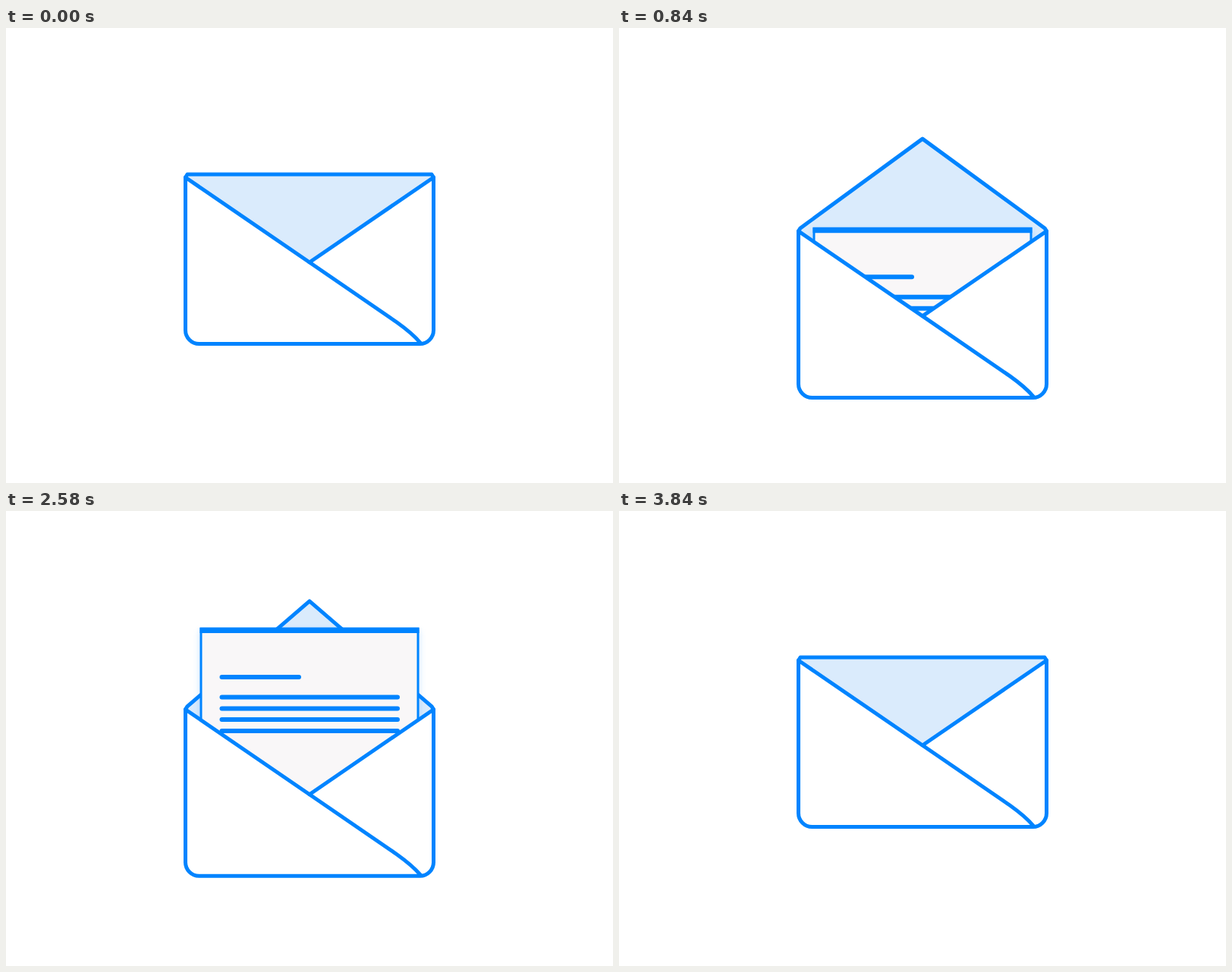
Recreate the animation shown at these times as an HTML page. Size 800 by 600 pixels, loop 4.14 s.

```html
<!DOCTYPE html>
<html lang="en">
<head>
<meta charset="utf-8">
<title>Opening envelope</title>
<style>
  html, body { margin: 0; height: 100%; overflow: hidden; background: #fff; }
  svg { display: block; width: 100%; height: 100%; }
  .line { fill: none; stroke: #0084ff; stroke-width: 5; stroke-linejoin: round; stroke-linecap: round; }
  .inside { fill: #daebfc; }
  #paper { filter: drop-shadow(0 5px 4px #0084ff38); }
</style>
</head>
<body>
<svg viewBox="0 0 800 600">
  <clipPath id="pocket"><rect x="200" y="-200" width="400" height="600"/></clipPath>
  <g id="envelope">
    <path class="inside" d="M237 195L400 309L563 195Z"/>
    <path id="flap" class="line inside"/>
    <g clip-path="url(#pocket)">
      <g id="paper">
        <rect x="257" y="2" width="286" height="300" fill="#f9f7f8" stroke="#0084ff" stroke-width="3"/>
        <path d="M255.5 3.8H544.5" stroke="#0084ff" stroke-width="7.5"/>
        <path class="line" stroke-width="6" style="stroke-width:6"
              d="M284.5 65.5H386M284.5 92H516M284.5 107H516M284.5 121.5H516M284.5 136.5H516"/>
      </g>
    </g>
    <path class="line" style="fill:#fff"
          d="M236.5 197L400 309L563.5 197V398.5A18 18 0 0 1 545.5 416.5H254.5A18 18 0 0 1 236.5 398.5Z"/>
    <path class="line" d="M400 309L515 388Q536 403 546 415"/>
  </g>
</svg>
<script>
const LOOP = 4140;
const [envelope, flap, paper] = ['envelope', 'flap', 'paper'].map(id => document.getElementById(id));

// Back ease in and out: pulls away first, then overshoots.
const back = z => z * z * (5 * z - 4) / 2;
function ease(x) {
  x = Math.min(1, Math.max(0, x));
  return x < 0.5 ? back(2 * x) : 1 - back(2 - 2 * x);
}

const openness = (t, openAt, closeAt, duration) =>
  ease((t - openAt) / duration) - ease((t - closeAt) / duration);

function draw(now) {
  const t = now % LOOP;
  const drop = 60.5 * openness(t, 14, 2450, 1200);
  const apex = 193 - 129 * openness(t, 150, 2442, 1200);
  const paperTop = 320 - 205 * openness(t, 270, 2400, 1100);
  envelope.setAttribute('transform', `translate(0 ${drop})`);
  flap.setAttribute('d', `M236.5 197L239 193L400 ${apex}L561 193L563.5 197`);
  paper.setAttribute('transform', `translate(0 ${paperTop})`);
  requestAnimationFrame(draw);
}
draw(0);
</script>
</body>
</html>
```
